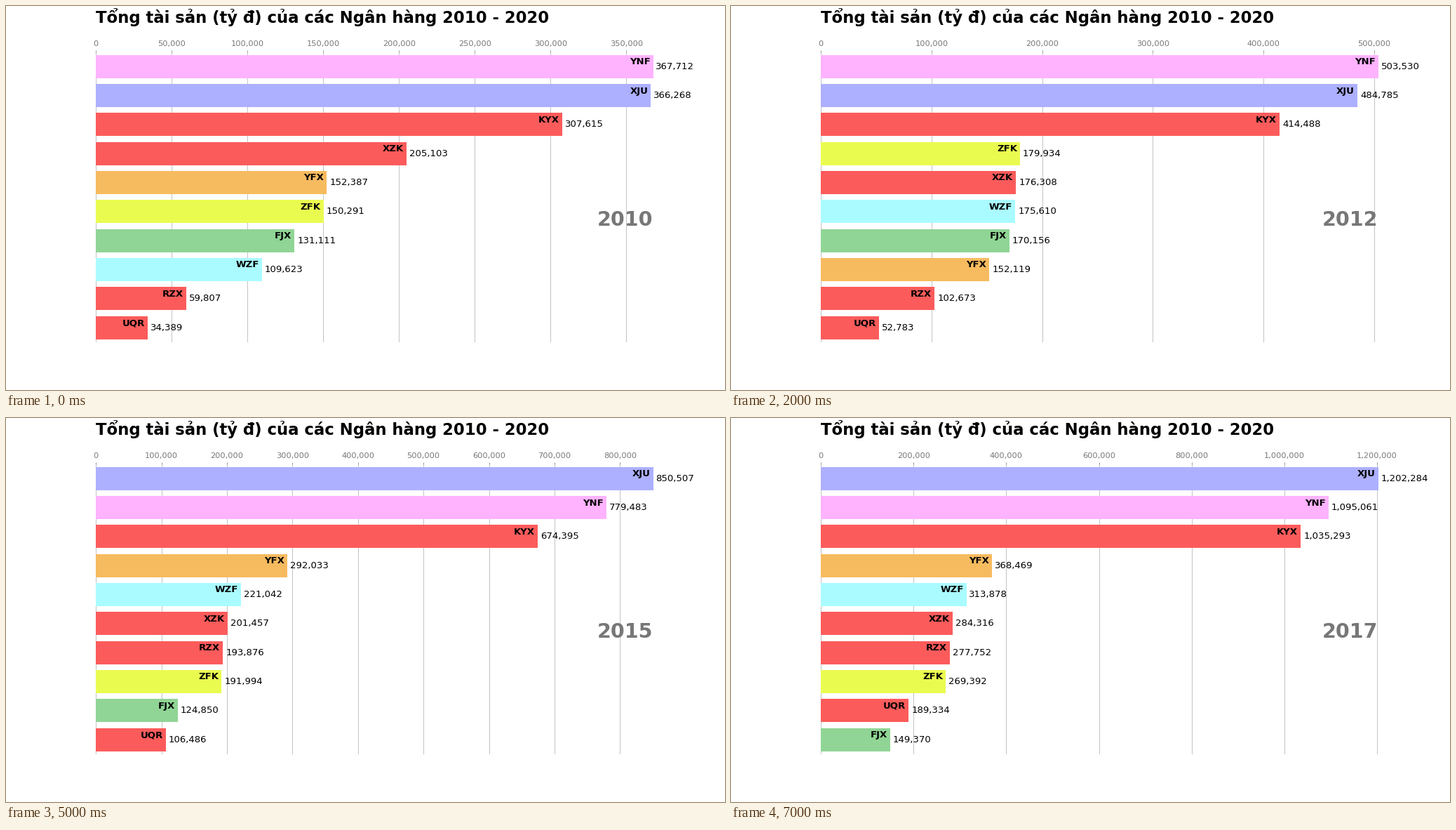
A matplotlib script that plays this animation: 1025 by 547 pixels, repeating every 8 s.

```python
import matplotlib.pyplot as plt
from matplotlib.animation import FuncAnimation
from matplotlib.ticker import StrMethodFormatter

WIDTH, HEIGHT = 1025, 547
DPI = 68.375
FIRST_YEAR = 2010
YEARS = 8
GRAY = "#777777"
RED = "#fc5b5b"

# Code: (bar colour, total assets per year)
BANKS = {
    "YNF": ("#ffb3ff", (367712, 460604, 503530, 576368,
                        661242, 779483, 948568, 1095061)),
    "XJU": ("#adb0ff", (366268, 405755, 484785, 548386,
                        650340, 850507, 1006404, 1202284)),
    "KYX": (RED, (307615, 366722, 414488, 468994,
                  576996, 674395, 787907, 1035293)),
    "XZK": (RED, (205103, 281019, 176308, 166599,
                  179610, 201457, 233681, 284316)),
    "YFX": ("#f7bb5f", (152387, 141469, 152119, 161378,
                        189803, 292033, 332023, 368469)),
    "ZFK": ("#eafb50", (150291, 180531, 179934, 158897,
                        175902, 191994, 235363, 269392)),
    "FJX": ("#90d595", (131111, 183567, 170156, 169835,
                        160145, 124850, 128802, 149370)),
    "WZF": ("#aafbff", (109623, 138831, 175610, 180381,
                        200489, 221042, 256259, 313878)),
    "RZX": (RED, (59807, 82818, 102673, 121264,
                  163241, 193876, 228771, 277752)),
    "UQR": (RED, (34389, 45025, 52783, 86227,
                  99525, 106486, 150294, 189334)),
}

plt.rcParams["font.family"] = "DejaVu Sans"
# The tiny surplus keeps the pixel width from being truncated.
fig, ax = plt.subplots(figsize=((WIDTH + 1e-6) / DPI, HEIGHT / DPI), dpi=DPI,
                       facecolor="white")
fig.subplots_adjust(left=0.125, right=0.9, bottom=0.125, top=0.88)


def style_axes():
    ax.xaxis.set_major_formatter(StrMethodFormatter("{x:,.0f}"))
    ax.xaxis.set_ticks_position("top")
    ax.tick_params(axis="x", colors=GRAY, labelsize=12)
    ax.set_yticks([])
    ax.margins(0, 0.01)
    ax.grid(which="major", axis="x", linestyle="-")
    ax.set_axisbelow(True)
    ax.set_frame_on(False)


def draw_year(index):
    ax.clear()
    ranking = sorted((values[index], code, color)
                     for code, (color, values) in BANKS.items())
    values, codes, colors = zip(*ranking)
    ax.barh(range(len(values)), values, color=colors)

    gap = max(values) / 200
    for row, (value, code) in enumerate(zip(values, codes)):
        ax.text(value - gap, row, code, size=14, weight=600,
                ha="right", va="bottom")
        ax.text(value + gap, row, f"{value:,}", size=14,
                ha="left", va="center")

    ax.text(1, 0.4, str(FIRST_YEAR + index), transform=ax.transAxes,
            color=GRAY, size=30, weight=800, ha="right")
    ax.text(0, 1.1, "Tổng tài sản (tỷ đ) của các Ngân hàng 2010 - 2020",
            transform=ax.transAxes, size=24, weight=600, ha="left")
    style_axes()
    return []


anim = FuncAnimation(fig, draw_year, frames=YEARS, interval=1000,
                     init_func=lambda: draw_year(0), repeat=True,
                     repeat_delay=0, blit=False)
plt.show()
```
